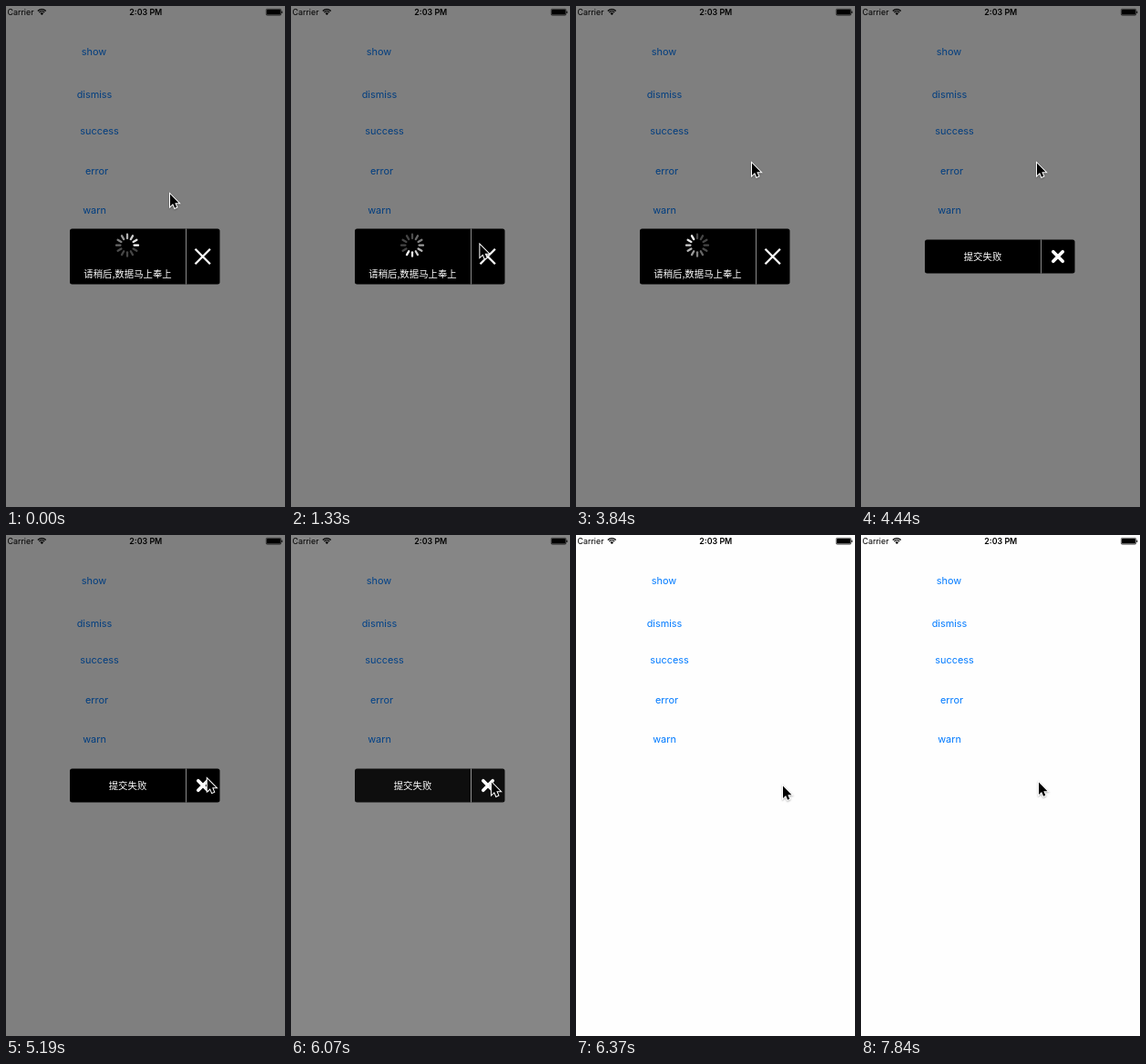
Recreate the animation shown at these times as an HTML page with a canvas. Size 306x550 px, loop 7990 ms.

```html
<!DOCTYPE html>
<html lang="zh-CN">
<head>
<meta charset="utf-8">
<title>HUD demo</title>
<style>
  html, body { margin: 0; width: 100%; height: 100%; overflow: hidden; background: #fefefe; }
  canvas { display: block; width: 306px; height: 550px; }
</style>
</head>
<body>
<canvas id="stage"></canvas>
<script>
const W = 306, H = 550, LOOP = 7990, TICKS = 54;
const LATIN = 'Inter, "Open Sans", sans-serif';
const CJK = '"Noto Sans CJK SC", "Noto Sans CJK", sans-serif';
const ratio = Math.max(1, window.devicePixelRatio || 1);

function prepare(canvas) {
  canvas.width = W * ratio;
  canvas.height = H * ratio;
  const c = canvas.getContext('2d');
  c.scale(ratio, ratio);
  return c;
}
const stage = prepare(document.getElementById('stage'));
const layer = document.createElement('canvas');
const over = prepare(layer);

// Screen recording clock: 150 ms ticks, some of them 140 ms.
const shortTicks = new Set([2, 6, 12, 19, 23, 28, 34, 40, 43, 46, 51]);
const starts = [0];
for (let i = 0; i < TICKS - 1; i++) starts.push(starts[i] + (shortTicks.has(i) ? 140 : 150));

// Pointer stops: tick, x, y
const path = [
  [0, 179, 205], [4, 214, 269], [8, 207, 264], [16, 192, 184], [19, 192, 181],
  [24, 192, 171], [30, 192, 171], [32, 228, 246], [33, 225, 258], [36, 218, 269],
  [37, 218, 269], [38, 218, 270], [39, 218, 270], [40, 219, 270], [41, 219, 270],
  [42, 220, 270], [43, 226, 274], [47, 100, 97], [50, 100, 97], [53, 194, 270]
];
const buttons = [
  ['show', 96.5, 50], ['dismiss', 97, 97.5], ['success', 102.5, 137.5],
  ['error', 99.5, 181.5], ['warn', 97, 224]
];
const POP = 29, PRESS = 50;
const FADE_START = 6006, FADE_TIME = 430;

function pointerAt(tick) {
  let i = 0;
  while (i < path.length - 2 && path[i + 1][0] <= tick) i++;
  const [t0, x0, y0] = path[i], [t1, x1, y1] = path[i + 1];
  const u = Math.min(1, (tick - t0) / (t1 - t0));
  const e = u * u * (3 - 2 * u);
  return [x0 + (x1 - x0) * e, y0 + (y1 - y0) * e];
}

function hudAlpha(tick) {
  if (tick <= 40) return 1;
  const u = Math.min(1, (starts[tick] - FADE_START) / FADE_TIME);
  if (tick >= 43) return 0;
  return 1 - u * u * (3 - 2 * u);
}

function label(c, text, x, y, font, color, align = 'center') {
  c.font = font;
  c.fillStyle = color;
  c.textAlign = align;
  c.textBaseline = 'alphabetic';
  c.fillText(text, x, y);
}

function statusBar(c) {
  label(c, 'Carrier', 1.5, 10, `400 8.9px ${LATIN}`, '#000', 'left');
  label(c, '2:03 PM', 153.3, 10, `600 8.9px ${LATIN}`, '#000');
  c.strokeStyle = c.fillStyle = '#000';
  c.lineWidth = 1.3;
  c.lineCap = 'butt';
  for (const r of [4.1, 6.3]) {
    c.beginPath();
    c.arc(39.3, 10, r, -Math.PI * 0.75, -Math.PI * 0.25);
    c.stroke();
  }
  c.beginPath();
  c.moveTo(39.3, 10);
  c.arc(39.3, 10, 2.5, -Math.PI * 0.75, -Math.PI * 0.25);
  c.fill();
  c.lineWidth = 0.6;
  c.beginPath();
  c.roundRect(285.3, 3.3, 16.4, 6.9, 1.2);
  c.stroke();
  c.beginPath();
  c.roundRect(286, 4, 15, 5.5, 0.6);
  c.fill();
  c.fillRect(302.2, 5.6, 1, 2.4);
}

function page(c, tick) {
  c.fillStyle = '#fefefe';
  c.fillRect(0, 0, W, H);
  statusBar(c);
  for (const [text, x, y] of buttons) {
    const pressed = tick === PRESS && text === 'dismiss';
    c.globalAlpha = pressed ? 0.3 : 1;
    label(c, text, x, y + 3.5, `400 10.9px ${LATIN}`, '#007aff');
  }
  c.globalAlpha = 1;
}

function cross(c, x, y, r, width, cap) {
  c.strokeStyle = '#fff';
  c.lineWidth = width;
  c.lineCap = cap;
  c.beginPath();
  c.moveTo(x - r, y - r);
  c.lineTo(x + r, y + r);
  c.moveTo(x + r, y - r);
  c.lineTo(x - r, y + r);
  c.stroke();
}

function spinner(c, x, y, ms) {
  const head = Math.floor(ms * 0.012 + 3.08);
  c.lineWidth = 2.3;
  c.lineCap = 'round';
  for (let k = 0; k < 12; k++) {
    const age = (head - k + 1200) % 12;
    const a = k * Math.PI / 6 - Math.PI / 2;
    const dx = Math.cos(a), dy = Math.sin(a);
    c.strokeStyle = `rgba(255,255,255,${Math.max(0.27, 1 - age * 0.1)})`;
    c.beginPath();
    c.moveTo(x + dx * 7.6, y + dy * 7.6);
    c.lineTo(x + dx * 12, y + dy * 12);
    c.stroke();
  }
}

function panel(c, height) {
  const top = 275 - height / 2;
  c.fillStyle = '#000';
  c.beginPath();
  c.roundRect(70, top, 164.5, height, 2.5);
  c.fill();
  c.fillStyle = '#999';
  c.fillRect(197, top, 0.9, height);
}

function hud(c, tick) {
  c.clearRect(0, 0, W, H);
  c.fillStyle = 'rgba(0,0,0,0.5)';
  c.fillRect(0, 0, W, H);
  const font = `400 10.4px ${CJK}`;
  if (tick < POP) {
    panel(c, 61);
    spinner(c, 133, 262.7, starts[tick]);
    label(c, '请稍后,数据马上奉上', 133.5, 297.8, font, '#fff');
    cross(c, 215.7, 275, 8.2, 2.3, 'butt');
    return;
  }
  c.save();
  if (tick === POP) {
    c.translate(152.2, 275);
    c.scale(1.08, 1.08);
    c.translate(-152.2, -275);
  }
  panel(c, 37);
  label(c, '提交失败', 133.5, 278.9, font, '#fff');
  cross(c, 216, 275, 5.2, 3.7, 'round');
  c.restore();
}

function pointer(c, [x, y]) {
  c.save();
  c.translate(x + 1, y + 1.6);
  c.beginPath();
  c.moveTo(0, 0);
  for (const [px, py] of [[0, 13.3], [3.1, 10.4], [5.1, 15.2], [7.3, 14.2], [5.3, 9.6], [9.5, 9.6]]) {
    c.lineTo(px, py);
  }
  c.closePath();
  c.shadowColor = 'rgba(0,0,0,0.35)';
  c.shadowBlur = 2 * ratio;
  c.shadowOffsetY = 0.8 * ratio;
  c.strokeStyle = '#fff';
  c.lineWidth = 2;
  c.lineJoin = 'miter';
  c.stroke();
  c.shadowColor = 'transparent';
  c.fillStyle = '#000';
  c.fill();
  c.restore();
}

function draw(now) {
  const t = now % LOOP;
  let tick = TICKS - 1;
  while (tick > 0 && starts[tick] > t) tick--;
  page(stage, tick);
  const alpha = hudAlpha(tick);
  if (alpha > 0) {
    hud(over, tick);
    stage.globalAlpha = alpha;
    stage.drawImage(layer, 0, 0, W, H);
    stage.globalAlpha = 1;
  }
  pointer(stage, pointerAt(tick));
}

const begin = performance.now();
function loop() {
  draw(performance.now() - begin);
  requestAnimationFrame(loop);
}
loop();
</script>
</body>
</html>
```
